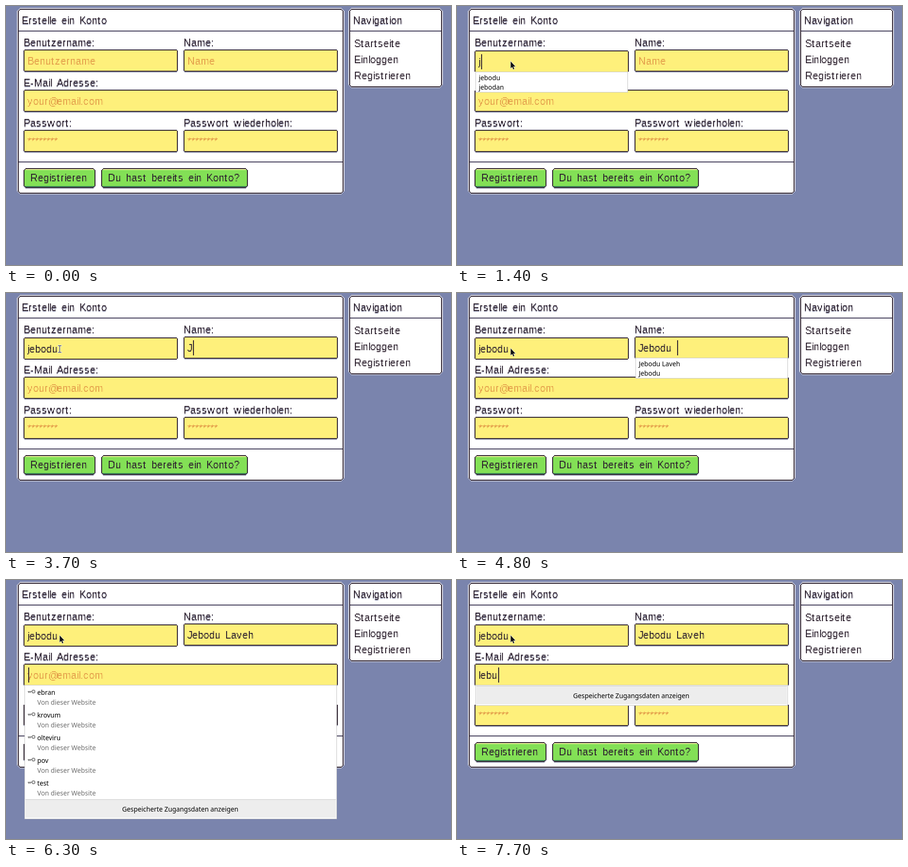
An HTML page with a canvas for the animation above (8000 ms loop, 940 by 548 pixels).

```html
<!DOCTYPE html>
<html lang="de">
<head>
<meta charset="utf-8">
<title>Erstelle ein Konto</title>
<style>
html, body { margin: 0; width: 100%; height: 100%; overflow: hidden; background: #7a84ad; }
canvas { display: block; }
</style>
</head>
<body>
<canvas id="stage" width="940" height="548"></canvas>
<script>
const LOOP = 8000;
const INK = '#2e222f', SHADE = '#b4b8cc', RIM = '#e0e1ea';
const YELLOW = '#fef07b', ORANGE = '#e4a04c', GREEN = '#83e056';
const ctx = document.getElementById('stage').getContext('2d');

function rect(x, y, w, h, color) {
  ctx.fillStyle = color;
  ctx.fillRect(x, y, w, h);
}

// Rectangle whose corners are stepped in 2px blocks
function stepped(x, y, w, h, steps, color) {
  for (let i = 0; i <= steps; i++) {
    const j = steps - i;
    rect(x + 2 * i, y + 2 * j, w - 4 * i, h - 4 * j, color);
  }
}

// Pixel lettering: half-size text with hard edges, enlarged twice
const PIXEL_FONT = '11px "Liberation Sans", Arial, sans-serif';
const SPACING = { ' ': 5, t: 4, w: 9, J: 5, '@': 9 };
const ruler = document.createElement('canvas').getContext('2d');
ruler.font = PIXEL_FONT;
const advance = c => SPACING[c] || Math.round(ruler.measureText(c).width + 0.01);
const pixelWidth = text => [...text].reduce((sum, c) => sum + advance(c), 0);
const lettering = new Map();

function letters(text, color) {
  const key = color + text;
  if (lettering.has(key)) return lettering.get(key);
  const canvas = document.createElement('canvas');
  canvas.width = pixelWidth(text) + 4;
  canvas.height = 15;
  const c = canvas.getContext('2d', { willReadFrequently: true });
  c.font = PIXEL_FONT;
  c.fillStyle = color;
  let x = 0;
  for (const letter of text) {
    c.fillText(letter, x, 10);
    x += advance(letter);
  }
  const image = c.getImageData(0, 0, canvas.width, canvas.height);
  for (let i = 3; i < image.data.length; i += 4) {
    image.data[i] = (image.data[i] - 80) * 2.4;
  }
  c.putImageData(image, 0, 0);
  lettering.set(key, canvas);
  return canvas;
}

function pixelText(text, x, baseline, color = INK, shadow) {
  if (!text) return;
  if (shadow) pixelText(text, x, baseline + 2, shadow);
  const image = letters(text, color);
  ctx.imageSmoothingEnabled = false;
  ctx.drawImage(image, x, baseline - 20, image.width * 2, image.height * 2);
}

function plainText(text, x, baseline, color = '#000', align = 'left') {
  ctx.font = '13.8px "Noto Sans", sans-serif';
  ctx.textAlign = align;
  ctx.fillStyle = color;
  ctx.fillText(text, x, baseline);
}

const fields = [
  { x: 37, y: 92, w: 326, label: 'Benutzername:', hint: 'Benutzername', value: 'jebodu',
    keys: [1300, 1600, 1800, 2000, 2200, 2300] },
  { x: 375, y: 92, w: 326, label: 'Name:', hint: 'Name', value: 'Jebodu Laveh',
    keys: [3700, 3900, 4100, 4400, 4600, 4700, 4800, 5000, 5200, 5300, 5500, 5600] },
  { x: 37, y: 177, w: 664, label: 'E-Mail Adresse:', hint: 'your@email.com', value: 'lebu',
    keys: [6900, 7000, 7200, 7700] },
  { x: 37, y: 262, w: 326, label: 'Passwort:', hint: '********' },
  { x: 375, y: 262, w: 326, label: 'Passwort wiederholen:', hint: '********' }
];
const [user, fullName, mail] = fields;
const accounts = ['ebran', 'krovum', 'olteviru', 'pov', 'test'];

const typed = (field, t) =>
  field.keys ? field.value.slice(0, field.keys.filter(k => k <= t).length) : '';

function panel(x, y, w, h, title) {
  stepped(x - 2, y - 2, w + 4, h + 4, 3, SHADE);
  stepped(x - 2, y - 2, w + 4, h + 2, 3, RIM);
  stepped(x, y, w, h, 2, INK);
  stepped(x + 2, y + 2, w - 4, h - 4, 1, '#fff');
  rect(x + 2, 52, w - 4, 2, '#45405c');
  pixelText(title, x + 8, 38, INK, SHADE);
}

function button(text, x, w) {
  stepped(x, 345, w, 42, 2, SHADE);
  stepped(x, 343, w, 42, 2, INK);
  stepped(x + 2, 345, w - 4, 38, 1, GREEN);
  rect(x + 4, 345, w - 8, 2, '#eef69a');
  rect(x + 4, 381, w - 8, 2, '#3c8a5c');
  pixelText(text, x + 14, 371);
}

function drawField(field, t, hovered) {
  const { x, w } = field, y = field.y + (hovered ? 2 : 0);
  pixelText(field.label, x, field.y - 7, INK, SHADE);
  if (!hovered) stepped(x, y + 2, w, 47, 1, SHADE);
  stepped(x, y, w, 47, 1, INK);
  rect(x + 2, y + 2, w - 4, 43, YELLOW);
  const text = typed(field, t);
  pixelText(text || field.hint, x + 8, y + 32, text ? INK : ORANGE);

  const focused = t < 1000 ? null : t < 2700 ? user : t < 6200 ? fullName : mail;
  const blinkedOff = (t >= 2300 && t < 2700) || (t >= 7400 && t < 7700);
  if (field === focused && !blinkedOff) {
    rect(x + 10 + 2 * pixelWidth(text), y + 8, 2, 32, INK);
  }
}

function popupBox(x, y, w, h) {
  rect(x, y, w, h, '#c4c4c4');
  rect(x + 1, y + 1, w - 2, h - 2, '#fff');
}

function suggestions(x, y, items) {
  popupBox(x, y, 322, 4 + 20 * items.length);
  items.forEach((item, i) => plainText(item, x + 7, y + 18 + 20 * i));
}

function keyIcon(x, y) {
  rect(x, y - 1, 9, 2, '#8a8a8a');
  rect(x + 1, y, 2, 3, '#8a8a8a');
  rect(x + 4, y, 2, 3, '#8a8a8a');
  ctx.strokeStyle = '#8a8a8a';
  ctx.lineWidth = 2;
  ctx.beginPath();
  ctx.arc(x + 12, y, 3, 0, 7);
  ctx.stroke();
}

function savedLogins(names) {
  const bottom = 222 + 44 + 48 * names.length;
  popupBox(39, 222, 660, bottom - 222);
  names.forEach((name, i) => {
    const y = 222 + 48 * i;
    keyIcon(46, y + 14);
    plainText(name, 66, y + 21);
    plainText('Von dieser Website', 66, y + 42, '#6e6e6e');
  });
  rect(41, bottom - 42, 656, 39, '#ededed');
  rect(41, bottom - 42, 656, 1, '#c8c8c8');
  plainText('Gespeicherte Zugangsdaten anzeigen', 368, bottom - 16, '#000', 'center');
}

// Draws the open popup, if any, and tells whether there is one
function popup(t) {
  if (t >= 1400 && t < 2700) {
    suggestions(39, 139, ['jebodu', 'jebodan'].slice(0, t < 2300 ? 2 : 1));
  } else if (t >= 3800 && t < 6200) {
    const count = t < 4000 ? 3 : t < 5000 ? 2 : 1;
    suggestions(377, 137, ['Jebodu Laveh', 'Jebodu', 'Juvepo'].slice(0, count));
  } else if (t >= 6300) {
    savedLogins(t < 7000 ? accounts : []);
  } else {
    return false;
  }
  return true;
}

// The pointer moves in 100 ms steps and slows towards the first field
function pointerAt(t) {
  if (t < 200) return null;
  const p = Math.min(1, (Math.floor(t / 100) - 2) / 4);
  const eased = 1 - (1 - p) ** 1.3;
  return { x: Math.round(230 - 117 * eased), y: Math.round(502 - 385 * eased) };
}

function arrow(x, y) {
  const shape = new Path2D('M0 0V14L3.2 11.2L5.4 16.4L7.4 15.5L5.2 10.4H9.6Z');
  ctx.save();
  ctx.translate(x + 0.5, y + 0.5);
  ctx.strokeStyle = '#ddd';
  ctx.lineWidth = 1.5;
  ctx.stroke(shape);
  ctx.fillStyle = '#111';
  ctx.fill(shape);
  ctx.restore();
}

function beam(x, y) {
  for (const [grow, color] of [[1, '#e8e8e8'], [0, '#333']]) {
    for (const [dx, dy, w, h] of [[-3, -7, 7, 1], [0, -7, 1, 15], [-3, 7, 7, 1]]) {
      rect(x + dx - grow, y + dy - grow, w + 2 * grow, h + 2 * grow, color);
    }
  }
}

function draw(t) {
  const pointer = pointerAt(t);
  const hovered = pointer && fields.find(f =>
    pointer.x >= f.x && pointer.x < f.x + f.w && pointer.y >= f.y && pointer.y < f.y + 48);

  rect(0, 0, 940, 548, '#7a84ad');
  panel(25, 6, 688, 391, 'Erstelle ein Konto');
  panel(725, 6, 196, 166, 'Navigation');
  ['Startseite', 'Einloggen', 'Registrieren'].forEach((link, i) =>
    pixelText(link, 735, 87 + 34 * i));
  rect(27, 329, 684, 2, '#45405c');
  button('Registrieren', 37, 152);
  button('Du hast bereits ein Konto?', 201, 310);
  fields.forEach(field => drawField(field, t, field === hovered));

  const open = popup(t);
  if (!pointer) return;
  if (hovered && !open) beam(pointer.x, pointer.y + 1);
  else arrow(pointer.x, pointer.y);
}

function tick() {
  draw(performance.now() % LOOP);
  requestAnimationFrame(tick);
}
tick();
</script>
</body>
</html>
```
